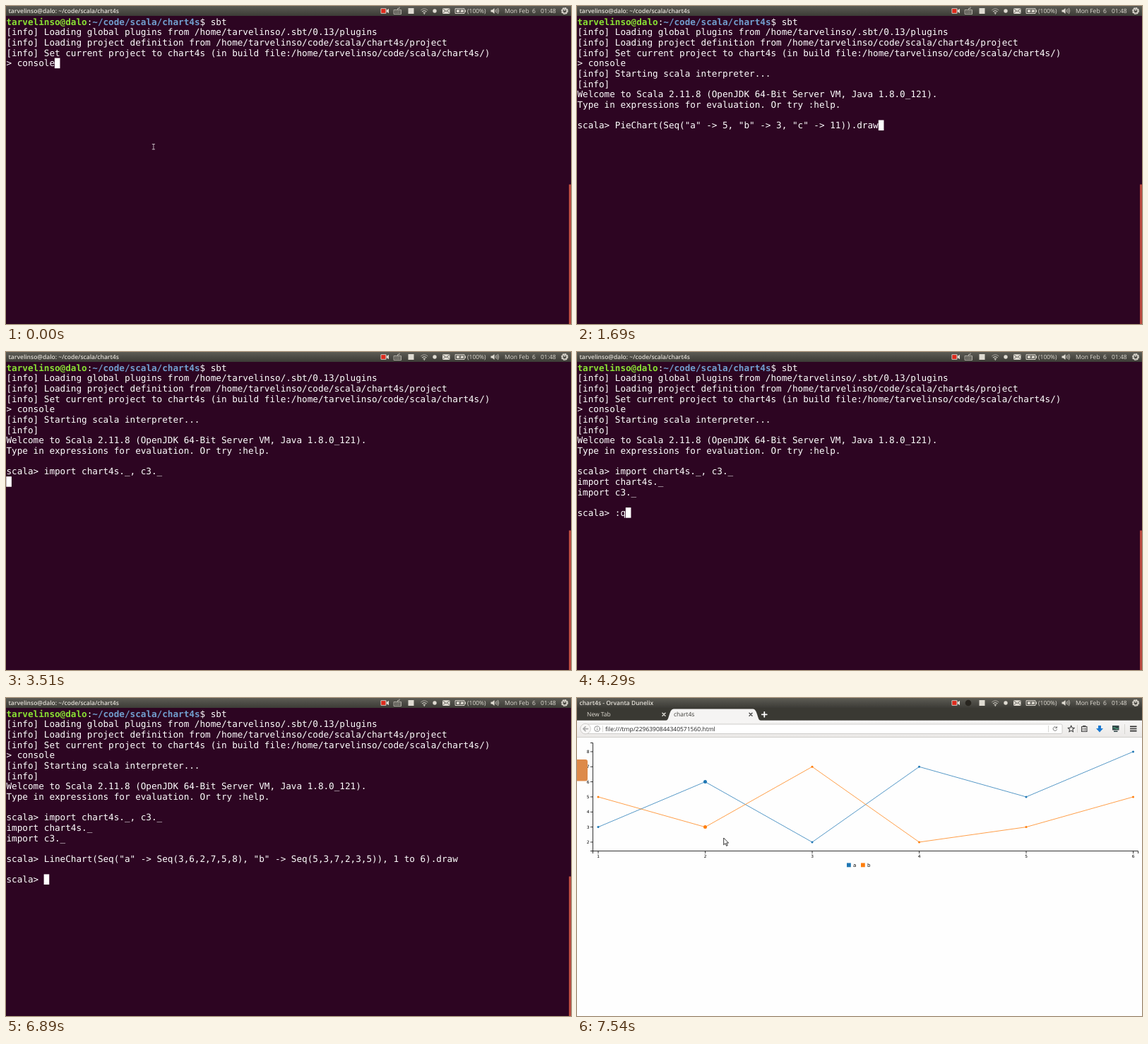
An HTML page that plays this animation: 800x450 px, repeating every 8000 ms.

```html
<!DOCTYPE html>
<html lang="en">
<head>
<meta charset="utf-8">
<title>Terminal to chart</title>
<style>
  html, body { margin: 0; width: 100%; height: 100%; overflow: hidden; background: #2d0522; }
  svg { display: block; width: 100vw; height: 100vh; }
  text { white-space: pre; text-rendering: geometricPrecision; font: 8.5px "Open Sans", "Noto Sans", sans-serif; }
  #term text { font: 12.65px "DejaVu Sans Mono", monospace; fill: #fff; }
  #term .bold { font-weight: 700; }
  #chart text { font: 5.86px "DejaVu Sans", sans-serif; fill: #000; }
  #chart .key { font-size: 7px; }
  .line { fill: none; stroke-linecap: round; stroke-linejoin: round; }
</style>
</head>
<body>
<svg viewBox="0 0 800 450">
  <defs>
    <linearGradient id="bar" x2="0" y2="1">
      <stop stop-color="#5d5c55"/><stop offset="1" stop-color="#3c3b36"/>
    </linearGradient>
    <linearGradient id="tool" x2="0" y2="1">
      <stop stop-color="#f7f6f5"/><stop offset="1" stop-color="#ebe9e7"/>
    </linearGradient>
    <path id="cross" class="line" d="M-2-2 2 2M2-2-2 2" stroke-width="1.4"/>
    <path id="plus" class="line" d="M-3.5 0H3.5M0-3.5V3.5" stroke="#fff" stroke-width="1.8"/>
  </defs>

  <g id="term">
    <rect width="800" height="450" fill="#2d0522"/>
    <text x=".5" y="26.8"><tspan class="bold" fill="#8ae234">tarvelinso@dalo</tspan>:<tspan class="bold" fill="#729fcf">~/code/scala/chart4s</tspan>$ sbt</text>
    <g id="rows"></g>
    <rect id="cursor" width="7.6" height="14.6" fill="#fff"/>
    <rect x="797" y="252.5" width="3" height="198" fill="#b8493f"/>
    <path id="beam" class="line" d="M207.2 195.5h3.4M207.2 202.8h3.4M208.9 195.5v7.3" stroke="#c9bfc6" stroke-width=".9"/>
  </g>

  <g id="browser">
    <rect width="800" height="450" fill="#fefefe"/>
    <rect y="14" width="800" height="18" fill="#3a3933"/>
    <text x="14" y="26.2" fill="#dfdbd2">New Tab</text>
    <g id="opening">
      <use href="#cross" x="123.5" y="23.3" stroke="#e8e6e0"/>
      <circle class="line" cx="125.5" cy="23.2" r="3.2" stroke="#2f86d2" stroke-width="1.7" stroke-dasharray="14 6"/>
      <use href="#plus" x="142" y="23.3"/>
    </g>
    <g id="opened">
      <use href="#cross" x="123" y="23.3" stroke="#e8e6e0"/>
      <path d="M126 32C131 32 130 15.5 137 15.5H249C256 15.5 255 32 260 32Z" fill="#f5f4f3"/>
      <text x="137" y="26.2" fill="#3c3b37">chart4s</text>
      <use href="#cross" x="246" y="23.3" stroke="#444"/>
      <use href="#plus" x="265.3" y="23.3"/>
    </g>
    <rect y="31.7" width="800" height="24" fill="url(#tool)"/>
    <path d="M0 55.5H800" stroke="#c9c7c4" stroke-width=".8"/>
    <rect x="14" y="37" width="673" height="13.5" rx="1.8" fill="#fff" stroke="#c4c2bf" stroke-width=".8"/>
    <circle cx="12" cy="43.6" r="7.3" fill="#f8f7f6" stroke="#c4c2bf" stroke-width=".8"/>
    <path class="line" d="M15.5 43.6H9M12 40.5 8.8 43.6 12 46.7" stroke="#aaa" stroke-width="1.6"/>
    <g id="info" class="line" stroke="#777" stroke-width=".8">
      <circle cx="28.5" cy="43.6" r="3.8"/><path d="M28.5 43.2v2.2M28.5 41.5v.1"/>
    </g>
    <path d="M36.5 39V48.5M667.5 39V48.5M708.5 38V49M775.5 37V51" stroke="#d0cecb" stroke-width=".8"/>
    <text x="40" y="46.6" fill="#222">file:///tmp/2296390844340571560.html</text>
    <use id="stop" href="#cross" x="677" y="43.6" stroke="#777"/>
    <path id="reload" class="line" d="M679.3 42A2.8 2.8 0 1 0 679.5 44.7M679.5 40.6V42.4H677.6" stroke="#777"/>
    <path class="line" d="M699.7 39 701 42.1 704.3 42.4 701.8 44.6 702.6 47.9 699.7 46.1 696.8 47.9 697.6 44.6 695.1 42.4 698.4 42.1Z" stroke="#444" stroke-width="1.1"/>
    <path class="line" d="M714.5 40.5H722V47.5H714.5ZM716.5 39.5H720M716 43H717M718.5 43H720.5M716 45.3H717M718.5 45.3H720.5" stroke="#444" stroke-width="1.1"/>
    <path d="M738 39H742V43H745L740 48.4 735 43H738Z" fill="#1b79d1"/>
    <path d="M758 39H767.5V45.5H758ZM760 46.5H765.5V48H760Z" fill="#34484a"/>
    <path class="line" d="M759.5 42H762L763 43.5H766" stroke="#4dc58c" stroke-width=".9"/>
    <path d="M783 40.3H792.5M783 43.5H792.5M783 46.7H792.5" stroke="#333" stroke-width="1.7"/>
    <g id="chart"></g>
    <ellipse id="glow" cx="0" cy="103" rx="1.8" ry="17" fill="#ddd"/>
    <rect id="launcher" y="87" width="30" height="30.5" rx="3" fill="#dd8a4a"/>
    <path d="M207.7 198V207.8L210 205.7 211.6 209.3 213.2 208.6 211.6 205.1H214.6Z" fill="#fff" stroke="#222" stroke-width=".9"/>
  </g>

  <rect width="800" height="14" fill="url(#bar)"/>
  <text id="title" x="3.5" y="10" font-weight="600" style="font-weight:600" fill="#e4e0d8"></text>
  <g fill="#dfdbd2">
    <rect x="530.5" y="3.3" width="8" height="7.4" rx="1"/>
    <rect x="531.3" y="4.1" width="6.2" height="5.8" fill="#dc2a1c"/>
    <path d="M538.7 6 542 3.8V10.2L538.7 8Z"/>
    <g id="keyboard" class="line" stroke="#bdb9b0" stroke-width=".9">
      <path d="M549.5 5.5H559.5V11.5H549.5ZM554.5 5.5V3.5H557V1.8"/>
      <path d="M551 7.4H558.5M551 9.5H558.5" stroke-dasharray="1 1.3"/>
    </g>
    <circle id="badge" cx="554" cy="7" r="4.3" fill="#28251f"/>
    <rect x="569.5" y="3" width="8" height="8"/>
    <g class="line" stroke="#dfdbd2" stroke-width="1">
      <path d="M587.5 5.8Q592.3 1.5 597 5.8" opacity=".6"/>
      <path d="M589.2 7.7Q592.3 5 595.3 7.7M590.9 9.5Q592.3 8.4 593.7 9.5"/>
      <path d="M592.3 10.8v.1" stroke-width="1.5"/>
    </g>
    <circle cx="607" cy="7" r="2.7"/>
    <rect x="618" y="3.3" width="10.5" height="7.6" rx=".6"/>
    <path class="line" d="M618.5 4 623.2 7.7 628 4M618.5 10.3 621.5 7.2M628 10.3 625 7.2" stroke="#4b4a45" stroke-width=".8"/>
    <path class="line" d="M636.5 3.7H649V10.5H636.5ZM650.5 5.8V8.4" stroke="#dfdbd2"/>
    <rect x="638" y="5.2" width="9.5" height="3.8"/>
    <path d="M643.8 4.2 641 7.5H642.7L641.8 10 645 6.6H643.2Z" fill="#464540"/>
    <path d="M686.5 5.5H688.5L691.5 3V11L688.5 8.5H686.5Z"/>
    <path class="line" d="M693 5.5Q694 7 693 8.5M694.8 4.3Q696.5 7 694.8 9.7M696.6 3.2Q699 7 696.6 10.8" stroke="#dfdbd2" stroke-width=".8"/>
    <text x="653" y="10">(100%)</text>
    <text x="706" y="10">Mon Feb  6</text>
    <text x="757" y="10">01:48</text>
    <circle class="line" cx="791" cy="7" r="3" stroke="#dfdbd2" stroke-width="1.2"/>
    <circle class="line" cx="791" cy="7" r="4.2" stroke="#dfdbd2" stroke-width="1.5" stroke-dasharray="1.5 1.8"/>
    <path d="M791 3.4V7" stroke="#dfdbd2" stroke-width="1.3"/>
  </g>
</svg>
<script>
const LOOP = 8000, COL = 7.617, ROW = 14.65, TOP = 15;
const $ = id => document.getElementById(id);
const show = (id, on) => $(id).setAttribute('visibility', on ? 'inherit' : 'hidden');

const prompt = 'scala> ';
const series = '(Seq("a" -> Seq(3,6,2,7,5,8), "b" -> Seq(5,3,7,2,3,5)), ';
const pie = prompt + 'PieChart(Seq("a" -> 5, "b" -> 3, "c" -> 11)).draw';
const bars = prompt + 'BarChart' + series + '(1 to 6).map("day " + _)).draw';
const lines = prompt + 'LineChart' + series + '1 to 6).draw';
const imports = prompt + 'import chart4s._, c3._';
const quit = prompt + ':q';

// [time, first row, text, cursor shown at the end of the text]
const events = [
  [0, 1, `[info] Loading global plugins from /home/tarvelinso/.sbt/0.13/plugins
[info] Loading project definition from /home/tarvelinso/code/scala/chart4s/project
[info] Set current project to chart4s (in build file:/home/tarvelinso/code/scala/chart4s/)
> console`, 1],
  [130, 4, '> console', 0],
  [390, 5, '', 1],
  [780, 5, '[info] Starting scala interpreter...\n[info]', 0],
  [1040, 7, 'Welcome to Scala 2.11.8 (OpenJDK 64-Bit Server VM, Java 1.8.0_121).\nType in expressions for evaluation. Or try :help.', 0],
  [1170, 10, prompt, 1],
  [1430, 10, prompt, 0],
  [1560, 10, quit, 1],
  [1690, 10, pie, 1],
  [1820, 10, bars, 1],
  [1950, 10, lines, 1],
  [2210, 10, imports, 1],
  [2340, 10, quit, 1],
  [2470, 10, imports, 1],
  [2730, 10, imports, 0],
  [2860, 11, '', 1],
  [3120, 11, '', 0],
  [3510, 11, '', 1],
  [3640, 11, 'import chart4s._', 0],
  [3770, 12, 'import c3._', 0],
  [3900, 14, prompt, 1],
  [4160, 14, imports, 1],
  [4290, 14, quit, 1],
  [4420, 14, pie, 1],
  [4680, 14, bars, 1],
  [4940, 14, lines, 1],
  [5330, 14, lines, 0],
  [5720, 14, lines, 1],
  [5980, 15, '', 1],
  [6240, 15, '', 0],
  [6500, 15, '', 1],
  [6630, 15, '', 0],
  [6890, 16, prompt, 1]
];

function add(parent, tag, attrs, text = '') {
  const el = document.createElementNS('http://www.w3.org/2000/svg', tag);
  for (const k in attrs) el.setAttribute(k, attrs[k]);
  el.textContent = text;
  return parent.appendChild(el);
}

const rows = Array.from({ length: 17 }, (_, i) =>
  add($('rows'), 'text', { x: .5, y: 26.8 + i * ROW }));

function drawChart() {
  const g = $('chart'), X = i => 30 + 151.5 * i, Y = v => 246.6 - 21.33 * v;
  let axes = 'M19 63.5H22.5V216.5M19 216.5H794.5V220M22.5 216.5V220';
  for (let v = 2; v < 9; v++) {
    axes += `M19 ${Y(v)}H22.5`;
    add(g, 'text', { x: 17.5, y: Y(v) + 2.1, 'text-anchor': 'end' }, v);
  }
  for (let i = 0; i < 6; i++) {
    axes += `M${X(i)} 216.5V220`;
    add(g, 'text', { x: X(i), y: 226.2, 'text-anchor': 'middle' }, i + 1);
  }
  add(g, 'path', { d: axes, fill: 'none', stroke: '#000', 'stroke-width': .8 });
  [['a', '#1f77b4', [3, 6, 2, 7, 5, 8], 382], ['b', '#ff7f0e', [5, 3, 7, 2, 3, 5], 402]].forEach(([name, color, data, x]) => {
    const points = data.map((v, i) => [X(i), Y(v)]);
    add(g, 'polyline', { points: points.join(' '), fill: 'none', stroke: color, 'stroke-width': .75 });
    points.forEach(([cx, cy], i) => add(g, 'circle', { cx, cy, r: i == 1 ? 2.5 : 1.5, fill: color }));
    add(g, 'rect', { x, y: 233.5, width: 5.8, height: 5.8, fill: color });
    add(g, 'text', { x: x + 9, y: 239, class: 'key' }, name);
  });
}

function drawTerminal(t) {
  const screen = [];
  let cursor;
  for (const [time, row, text, on] of events) {
    if (time > t) break;
    const parts = text.split('\n'), last = parts.length - 1;
    parts.forEach((s, i) => screen[row + i] = s);
    cursor = on && [parts[last].length, row + last];
  }
  rows.forEach((el, i) => {
    const s = screen[i] || '';
    if (el.textContent !== s) el.textContent = s;
  });
  show('cursor', cursor);
  if (cursor) {
    $('cursor').setAttribute('x', cursor[0] * COL + .3);
    $('cursor').setAttribute('y', cursor[1] * ROW + TOP);
  }
  show('beam', t < 390);
}

function drawBrowser(t) {
  const opened = t >= 7150, loaded = t >= 7280;
  show('opening', !opened);
  show('opened', opened);
  show('stop', !loaded);
  show('reload', loaded);
  show('chart', loaded);
  show('glow', !opened);
  $('info').setAttribute('opacity', opened ? 1 : .4);
  const step = Math.min(4, Math.floor((t - 7020) / 130));
  $('launcher').setAttribute('x', step * 3.75 - 30);
}

function draw(now) {
  const t = now % LOOP, web = t >= 7020;
  show('term', !web);
  show('browser', web);
  show('keyboard', t < 7410);
  show('badge', t >= 7410);
  $('title').textContent = !web ? 'tarvelinso@dalo: ~/code/scala/chart4s'
    : (t < 7150 ? 'New Tab' : 'chart4s') + ' - Orvanta Dunelix';
  if (web) drawBrowser(t); else drawTerminal(t);
  requestAnimationFrame(draw);
}

drawChart();
draw(0);
</script>
</body>
</html>
```
